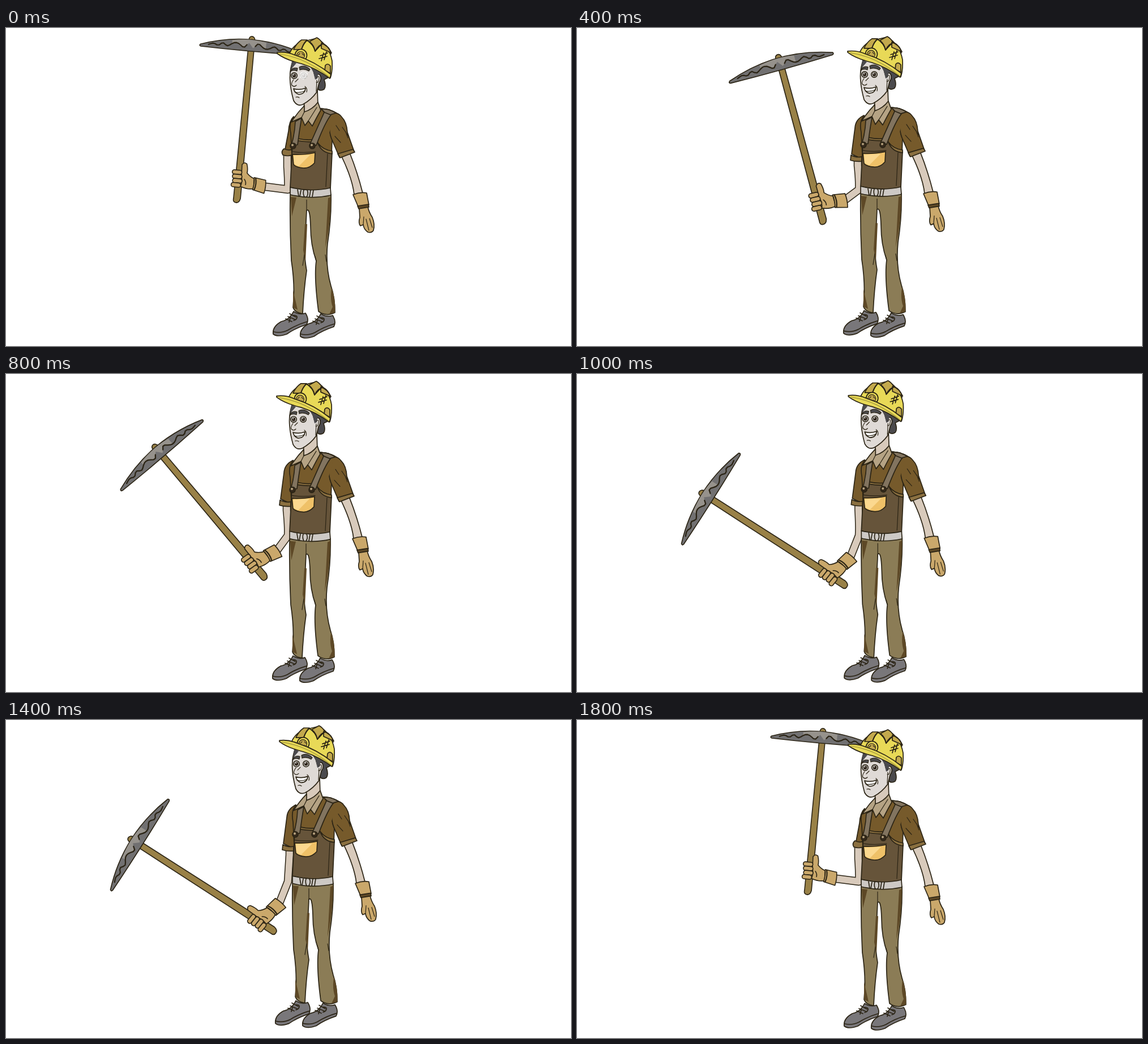
These frames come from a looping animation (998x561 px, 2010 ms). An HTML page:

```html
<!DOCTYPE html>
<html lang="en">
<head>
<meta charset="utf-8">
<title>Miner with pickaxe</title>
<style>
html,body{margin:0;width:100%;height:100%;overflow:hidden;background:#fff}
svg{display:block;width:100%;height:100%}
.o{stroke:#2b2415;stroke-width:1.7;stroke-linejoin:round;stroke-linecap:round}
.l{fill:none}
.skin{fill:#d8cabb}.face{fill:#dfdad6}.hair{fill:#4b4a4d}
.shirt{fill:#765a2b}.trim{fill:#8b7040}.collar{fill:#b5a384}
.bib{fill:#66543a}.strap{fill:#82745f}
.pants{fill:#8b7c56}.shade{fill:#5d4826}
.belt{fill:#cdc9c5}.shoe{fill:#79777a}
.glove{fill:#caa86b}.wood{fill:#998147}.iron{fill:#717071}.worn{fill:#96928c}
.hat{fill:#e8d957}.ridge{fill:#c3a94d}
.thin{stroke-width:1.2}.bold{stroke-width:2.3}
.limb{fill:none;stroke-linejoin:round}
</style>
</head>
<body>
<svg viewBox="0 0 998 561" xmlns="http://www.w3.org/2000/svg">
<path id="armEdge" class="limb" stroke="#2b2415" stroke-width="14.5"/>
<path id="armSkin" class="limb" stroke="#d8cabb" stroke-width="11.5"/>

<g id="pick">
  <path class="o wood" d="M-5-9C-7-20 7-20 6-9L7 288Q5 297-1 296-7 296-6 288Z"/>
  <path class="o iron" d="M-95 6Q0-28 96 5Q98 8 94 9Q0 12-94 10Q-98 9-95 6Z"/>
  <path id="worn" class="worn"/>
  <path id="grain" class="o l bold"/>
  <g id="hand">
    <path class="o glove" d="M4-25Q8-31 13-27Q16-18 15-10Q22-3 29-1L30 18Q18 21 5 16Q8 7 5-3Z"/>
    <path class="o glove" d="M29-3L51 0Q53 13 50 25L28 20Q31 8 29-3Z"/>
    <path class="o l bold" d="M32-2Q35 9 31 20"/>
    <path class="o l" d="M11 2Q15 7 14 12"/>
    <g id="fingers"></g>
  </g>
</g>

<g id="body">
  <!-- trousers -->
  <path class="o pants" d="M502 294Q501 350 504 410Q511 455 507 493Q510 502 524 504Q526 462 531 428Q526 400 528 382L531 322Q537 316 538 350Q538 383 548 411Q544 440 552 500Q566 510 581 502Q581 475 574 455Q564 420 568 380Q575 335 574 294Z"/>
  <path class="shade" d="M503 298L513 299 505 332ZM574 298L569 300 564 388Q574 340 574 298ZM528 346H532L529 412 525 392ZM507 462L515 497 507 493ZM575 458Q572 478 577 492L571 505 581 502Q583 480 575 458Z"/>
  <path class="o l thin" d="M531 322V303M527 400L524 419M548 411L546 403M564 400L566 412"/>
  <!-- shoes -->
  <g id="shoe">
    <path class="o shoe" d="M508 500Q501 515 486 518Q470 527 472 540Q480 546 496 540Q510 530 531 523Q536 514 529 503Q519 507 508 500Z"/>
    <path class="o l" d="M473 536Q486 539 498 533Q514 523 532 518"/>
    <path class="o l" d="M501 504L512 510M498 509L510 514M494 513L505 518M508 507Q515 507 514 511T508 516M502 512L500 519"/>
  </g>
  <use href="#shoe" x="48" y="4"/>
  <!-- neck and shirt -->
  <path class="o skin" d="M527 132L524 160 536 172 551 138 550 108Z"/>
  <path id="sleeve" class="o shirt"/>
  <path id="hem" class="o trim"/>
  <path class="o shirt" d="M508 157Q499 166 503 186L505 225H575L576 196 589 154Q579 144 556 142L536 165Z"/>
  <g id="arm">
    <path class="o skin" d="M592 225L607 220Q621 255 630 291L615 294Q612 266 592 225Z"/>
    <path class="o shirt" d="M574 151Q586 147 593 157Q602 166 603 184L615 218 589 228 577 200Q567 180 574 151Z"/>
    <path class="o trim" d="M586 222L613 214 616 219 590 229Z"/>
    <path class="o l thin" d="M583 172L589 181M594 175L605 191M581 191L591 202M600 183L604 194"/>
    <path class="o glove" d="M624 318L639 315Q641 325 647 334Q652 346 649 357Q646 362 639 360Q632 355 631 347L626 349Q622 344 625 334Z"/>
    <path class="o l thin" d="M632 333L631 347M636 337L641 357M642 336L647 352"/>
    <path class="o glove" d="M613 294Q625 289 637 291L641 312 622 315Z"/>
    <path class="o shade" d="M621 314L640 311 641 316 623 319Z"/>
  </g>
  <path class="shirt" d="M562 150L579 156 571 185 574 208 555 200Z"/>
  <!-- bib -->
  <path class="o bib" d="M516 196Q532 199 549 197Q553 216 576 220L573 284Q535 290 502 281L505 222 506 205Z"/>
  <path class="o trim" d="M516 195Q533 199 549 196L549 200Q533 202 516 199ZM551 203Q560 215 576 217L576 222Q557 220 551 203Z"/>
  <path class="o l thin" d="M568 222L565 280M506 218Q525 221 547 218"/>
  <path class="o strap" d="M511 165L522 159Q518 183 515 206L504 207Q510 187 511 165ZM557 142L571 144 575 152Q564 165 548 207L537 205 562 149Z"/>
  <path class="o strap" d="M557 143Q568 141 583 150L573 153 563 149Z"/>
  <g id="button"><circle class="o" cx="507" cy="208" r="5" fill="#34291b"/><circle cx="506" cy="206.5" r="2" fill="#b6a27e"/></g>
  <use href="#button" x="34"/>
  <path class="o" fill="#efc168" d="M506 223Q525 224 546 220L545 238Q536 248 525 247Q513 246 508 241Z"/>
  <path fill="#fbd88f" d="M508 225L537 224 517 244 509 240Z"/>
  <!-- collar -->
  <path class="o collar" d="M527 137Q514 150 504 166L522 158 528 172 534 164 541 173Q549 157 556 145L551 131Q541 144 527 148Z"/>
  <path class="o l thin" d="M527 148L522 158M534 164L549 140"/>
  <!-- belt -->
  <path class="o belt" d="M502 281Q538 290 573 282L574 295Q538 303 502 294Z"/>
  <path class="o l" d="M515 285L517 297M521 286L519 297M526 286Q524 292 527 298M532 286Q535 292 531 298M538 286L536 298M543 286L541 298"/>
  <!-- head -->
  <path class="o hair" d="M538 64L572 86 562 91Q566 103 562 108Q556 112 551 108L553 84Z"/>
  <path class="o face" d="M507 57Q500 75 502 96Q503 110 508 128Q514 139 524 135Q539 127 549 113L553 97Q559 89 554 82Q548 80 546 86L541 69Z"/>
  <path class="hair" d="M505 58L513 62 506 70 502 82ZM536 66L552 77 550 89 546 91 543 78Z"/>
  <path class="o l thin" d="M549 87Q554 83 553 90T548 96M549 92L548 112M516 90L511 95M508 91Q503 98 505 101Q509 105 513 101"/>
  <g id="eye"><circle class="o" cx="509" cy="84" r="5.2" fill="#fff"/><circle cx="509" cy="84" r="3.4" fill="#30261c"/><circle cx="508" cy="82.5" r="1" fill="#fff"/></g>
  <use href="#eye" x="17"/>
  <path class="o hair thin" d="M502 77Q507 68 515 71L514 76Q507 73 502 77ZM518 69Q527 64 537 73L535 76Q527 71 519 74Z"/>
  <path id="glare" fill="#fff" d="M520 79Q527 74 533 80L531 88 525 91 519 87Z"/>
  <path class="o" fill="#fff" d="M508 107Q519 110 529 106Q528 117 517 117Q510 115 508 107Z"/>
  <path class="o l thin" d="M510 113Q519 115 528 111M528 103Q533 107 531 113M512 122Q515 121 518 123"/>
  <!-- helmet -->
  <path class="o hat" d="M500 46Q506 32 520 25L549 18Q571 31 576 58Q577 76 573 88Q552 68 500 50Z"/>
  <path class="o ridge" d="M508 38Q513 27 522 21L532 21Q525 27 522 38ZM536 24L549 17Q555 20 559 27L546 41Q544 30 536 24ZM557 27Q569 31 575 44L557 36Z"/>
  <path class="o l" d="M522 37Q527 25 532 22Q543 29 546 41M546 41Q552 29 561 28Q572 33 574 46"/>
  <circle class="o hat" cx="521" cy="48" r="10.5"/>
  <circle class="o ridge thin" cx="520.5" cy="48.5" r="7"/>
  <path class="o l thin" d="M516 48L519 45M523 45L526 48M518 52L524 52"/>
  <path class="o l" d="M555 49L568 44M553 54L567 50M561 44L557 58M566 42L562 56"/>
  <path class="o ridge" d="M564 66Q568 61 573 67L573 80 563 75Z"/>
  <path class="o hat" d="M479 43Q495 41 511 48Q546 59 574 82L572 89Q550 72 522 63Q493 56 479 45Z"/>
  <path class="o l thin" stroke-opacity=".4" d="M484 46Q506 49 530 60Q554 72 570 86"/>
</g>
</svg>
<script>
const $ = id => document.getElementById(id);
const set = (id, name, value) => $(id).setAttribute(name, value);
const LOOP = 2010, STEP = 200, CYCLE = 9, GRIP = 249;

// Hand x, y and handle angle: raised, ready, half way, low, struck
const keys = [[411, 264, 5.4], [424, 303, -14.6], [430, 325, -35.8], [444, 354, -57.3], [478, 375, -103.9]];
// Progress along the keys at each step
const swing = [0, 1, 1.03, 1.26, 2.2, 3, 4, 3, 2];

const sleeves = {
  raised: ["M508 156Q500 164 499 182L493 214 504 224 507 200Z",
           "M491 213Q500 217 505 214L505 224Q498 227 489 224Q485 218 491 213Z"],
  lowered: ["M508 156Q493 163 492 178L486 224 505 233 507 200Z",
            "M485 226Q494 231 504 229L504 237Q493 238 484 235Z"]
};

const clamp = v => Math.min(1, Math.max(0, v));
const smooth = v => (v = clamp(v)) * v * (3 - 2 * v);

function turn(x, y, deg) {
  const a = deg * Math.PI / 180, c = Math.cos(a), s = Math.sin(a);
  return [x * c - y * s, x * s + y * c];
}

function mix(depth) {
  const i = Math.min(keys.length - 2, Math.floor(depth));
  return keys[i].map((v, n) => v + (keys[i + 1][n] - v) * (depth - i));
}

// Ragged line across the iron, thinning out towards the tips
function ragged(from, to) {
  let d = "";
  for (let x = from; x <= to; x += 4) {
    const y = 7 * (x / 96) ** 2 + (1 - Math.abs(x) / 110) * 5 * Math.sin(x * .27 + Math.sin(x * .11));
    d += `${d ? "L" : "M"}${x} ${y.toFixed(1)}`;
  }
  return d;
}

function build() {
  set("grain", "d", ragged(-80, -6) + ragged(8, 80));
  set("worn", "d", ragged(-36, 28) + "L28-8Q0-14-36-7Z");
  for (let i = 0; i < 4; i++)
    $("fingers").innerHTML += `<rect class="o glove" x="${-13 + i % 3}" y="${-14 + i * 8}" width="18" height="8" rx="3.8"/>`;
}

function pose(step) {
  const k = step % CYCLE, depth = swing[k];
  const [hx, hy, angle] = mix(depth);

  // The pickaxe hangs from the hand, the grip sliding down as it falls
  const size = .94 + .05 * clamp(depth), grip = GRIP + 2.5 * depth, wrist = 2 * depth;
  const [gx, gy] = turn(0, grip * size, angle);
  set("pick", "transform", `translate(${hx - gx} ${hy - gy}) rotate(${angle}) scale(${size})`);
  set("hand", "transform", `translate(0 ${grip}) rotate(${wrist})`);

  // The body rises slowly and leans to the right, then drops back
  const rise = Math.min(7, k * 1.05), lean = 5 * smooth((k - 4) / 3) - clamp(k);
  const squash = .35 * rise / 530;
  set("body", "transform", `matrix(1 0 0 ${1 + squash} ${lean} ${-rise - 17 * squash})`);
  set("arm", "transform", `rotate(${k > 5 ? 6.5 * (1 + Math.cos(Math.PI * k)) : 0} 585 165)`);

  const [wx, wy] = turn(46 * size, 12 * size, angle + wrist);
  const sx = 497 + lean, sy = 215 - rise;
  const limb = `M${sx} ${sy}V${sy + 30}Q499 270 498 285L${hx + wx} ${hy + wy}`;
  set("armEdge", "d", limb);
  set("armSkin", "d", limb);

  const [cloth, hem] = depth < .5 ? sleeves.raised : sleeves.lowered;
  set("sleeve", "d", cloth);
  set("hem", "d", hem);
  set("glare", "opacity", step ? 0 : .8);
}

const start = performance.now();
function draw(now) {
  const t = Math.max(0, now - start) % LOOP;
  pose(Math.min(CYCLE, Math.floor(t / STEP)));
  requestAnimationFrame(draw);
}
build();
pose(0);
requestAnimationFrame(draw);
</script>
</body>
</html>
```
